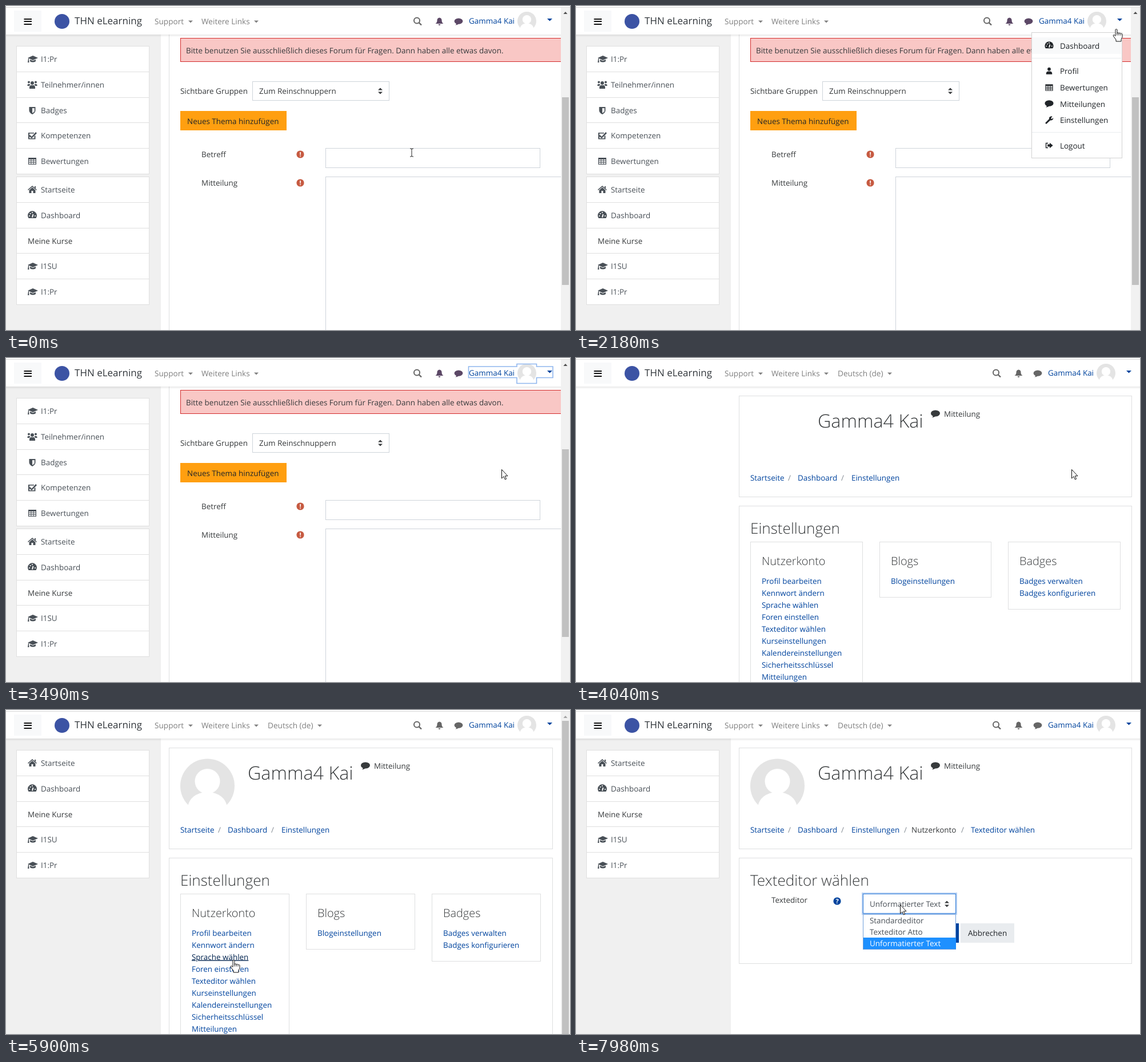
Write an HTML page that moves like this. It is 987 px wide and 568 px high and loops after 8000 ms.

```html
<!DOCTYPE html>
<html lang="de">
<head>
<meta charset="utf-8">
<title>Texteditor wählen</title>
<style>
  html, body { margin: 0; width: 100%; height: 100%; overflow: hidden; background: #fff; }
  svg { display: block; width: 987px; height: 568px; }
  text { font-family: "Open Sans", "Noto Sans", sans-serif; text-rendering: geometricPrecision; }
</style>
</head>
<body>
<svg id="stage" viewBox="0 0 987 568"></svg>
<script>
const stage = document.getElementById('stage');
const LOOP = 8000, USER = 'Gamma4 Kai';
const INK = '#373a3c', LINK = '#00449e', LINE = '#dedfe0', FIELD = '#ced4da', BODY = 13.45;

// Glyphs centred on 0,0: filled path, then white strokes on top
const ICONS = {
  cap: ['M-9-2L0-6 9-2 0 2ZM-5 1V4Q0 7 5 4V1L0 3ZM-8-1L-9 6H-6.5L-7-1Z'],
  users: ['M-3-3a3 3 0 1 1 6 0a3 3 0 1 1-6 0M-5 7V4Q-4 0 0 1 4 0 5 4V7Z' +
    'M-8-4.5a2 2 0 1 1 4 0a2 2 0 1 1-4 0M4-4.5a2 2 0 1 1 4 0a2 2 0 1 1-4 0' +
    'M-8.5 2V0Q-7-2-3.5-1L-5 2ZM8.5 2V0Q7-2 3.5-1L5 2Z'],
  shield: ['M-5.5-6H5.5V0Q5.5 4 0 7-5.5 4-5.5 0Z', 'M1-4V4.2M2.8-4V2.6'],
  check: ['M-7-5H3V-3.5H-5V5H3.5V1L5.5 0V6.5H-7ZM-4-1L-1 2 6-6 8-4-1 5-6 1Z'],
  table: ['M-7-6H7V6H-7Z', [-2, 1, 4].map(y => `M-5.8 ${y}h3.2m1 0h3.2m1 0h3.2`).join('')],
  home: ['M-8 0L0-7 8 0 7 1 0-5-7 1ZM-5.5 1L0-4 5.5 1V6H1.5V2H-1.5V6H-5.5ZM4-6H6V-2L4-4Z'],
  gauge: ['M-6.5 5A8 8 0 1 1 6.5 5Z', 'M0 3.5L1.5-2M-5.8 1h1.6M-4.2-3h1.6M-.8-5h1.6M4.2 1h1.6'],
  user: ['M-3-3.5a3 3 0 1 1 6 0a3 3 0 1 1-6 0M-5.5 6V4Q-5 0 0 .5 5 0 5.5 4V6Z'],
  bubble: ['M-8-1a8 5.5 0 1 1 8 5.5Q-3 6-6 6.5-4 5-4.5 3.8-8 2-8-1Z'],
  wrench: ['M-7 5L0-2Q-1-6 4-7L6-6.5 3.5-4 4-2.5 5.5-2 7.5-4.5Q8 1 2 .5L-5 7Q-7 7-7 5Z'],
  logout: ['M-2-5H-6.5V5H-2V3.5H-5V-3.5H-2ZM-3-2H1V-5L7 0 1 5V2H-3Z'],
  bell: ['M-7 4Q-4 2-4-2-4-6 0-6.5 4-6 4-2 4 2 7 4ZM-2 5H2Q1.5 7 0 7-1.5 7-2 5Z']
};

const CURSORS = {
  arrow: '<path d="M.5.5V16L4 12.7 6.4 18 8.6 17 6.3 11.8H11Z" fill="#fff" stroke="#111"/>',
  beam: '<path d="M-3-7H-1L0-6 1-7H3M0-6V6M-3 7H-1L0 6 1 7H3" fill="none" stroke="#222"/>',
  hand: '<path d="M-1 2Q-1 .5 .5 .5T2 2V8Q2 7 3.5 7T5 8.5Q5 7.5 6.5 7.5T8 9Q8 8.5 9.5 8.5T11 10V14.5L9 18.5V22' +
    'H0V19L-4.5 13Q-5.5 10.5-3.5 10.5L-1 12.5Z" fill="#fff" stroke="#111"/>' +
    '<path d="M2 7.5V11.5M5 8.5V11.5M8 9.5V11.5" stroke="#111"/>'
};

// Pointer moves: first step, last step, number of steps, end point
const MOVES = [
  [70, 70, 1, 711, 257], [230, 700, 7, 969, 70], [780, 1010, 4, 954, 21],
  [2180, 2790, 9, 870, 191], [3020, 3020, 1, 868, 195], [3190, 3190, 1, 867, 195],
  [4350, 4580, 4, 424, 251], [4810, 5200, 6, 406, 435], [5350, 5500, 3, 399, 431],
  [5900, 6280, 6, 394, 475], [7360, 7740, 6, 567, 341]
];
const CLICKS = [[1080, 1320], [3340, 3490], [6510, 6590], [7800, 7980]];

const within = (t, a, b) => t >= a && t < b;
const rect = (x, y, w, h, fill, stroke = 'none') =>
  `<rect x="${x}" y="${y}" width="${w}" height="${h}" fill="${fill}" stroke="${stroke}"/>`;
const box = (x, y, right, bottom, fill = '#fff', stroke = LINE) =>
  rect(x + .5, y + .5, right - x - 1, bottom - y - 1, fill, stroke);
const path = (d, fill, more = '') => `<path d="${d}" fill="${fill}" ${more}/>`;
const circle = (x, y, r, fill, more = '') => `<circle cx="${x}" cy="${y}" r="${r}" fill="${fill}" ${more}/>`;
const text = (x, y, s, fill = INK, size = BODY, more = '') =>
  `<text x="${x}" y="${y}" fill="${fill}" font-size="${size}" ${more}>${s}</text>`;
const light = (x, y, s, size) => text(x, y, s, INK, size, 'font-weight="300"');
const at = (x, y, body, scale = 1) => `<g transform="translate(${x} ${y}) scale(${scale})">${body}</g>`;
const caret = (x, y, fill, w = 4) => path(`M${x - w} ${y}h${2 * w}l${-w} ${w}z`, fill);
const sorter = (x, y) => path(`M${x - 4} ${y - 1.5}h8l-4-4zM${x - 4} ${y + 1.5}h8l-4 4z`, INK);
const badge = (x, y, mark, fill) => circle(x, y, 6.6, fill) +
  text(x, y + 4, mark, '#fff', 11, 'font-weight="700" text-anchor="middle"');

function icon(name, x, y, fill = '#495057', scale = 1) {
  const [d, cut] = ICONS[name];
  return at(x, y, path(d, fill) + (cut ? path(cut, 'none', 'stroke="#fff" stroke-width="1.9"') : ''), scale);
}

const avatar = (x, y, r) => at(x, y, circle(0, 0, 47.5, '#e4e4e4') + circle(0, -8, 22, '#fff') +
  path('M-34 35C-28 3 28 3 34 35L20 48H-20Z', '#fff'), r / 47.5);

function header(shift, lang, tint, hover, focus) {
  const blue = hover ? '#c4720c' : LINK, grey = '#7f7f7f';
  let s = rect(0, 0, 987, 50, '#fff') + rect(0, 2, 987, 1, '#d8d8d8') + rect(14, 8, 48, 37, '#f8f9fa');
  for (let i = 0; i < 4; i++) s += rect(0, 50 + i, 987, 1, `rgba(0,0,0,${.08 - i * .02})`);
  for (const y of [22, 26, 31]) s += rect(31.5, y, 13.5, 2, '#111');
  s += circle(98, 27, 13, '#3c53a4') + text(120, 32, 'THN eLearning', '#30353a', 17);
  s += text(260, 32, 'Support', grey, 13.6) + caret(323, 25.5, grey);
  s += text(342, 32, 'Weitere Links', grey, 13.6) + caret(438, 25.5, grey);
  if (lang) s += text(458, 32, 'Deutsch (de)', grey, 13.6) + caret(549, 25.5, grey);
  return s + at(shift, 0,
    circle(719, 25.5, 5, 'none', 'stroke="#666" stroke-width="2"') +
    path('M722.5 29L727 33.5', 'none', 'stroke="#666" stroke-width="2.4"') +
    icon('bell', 758.5, 27, tint) + icon('bubble', 792, 27.5, tint, .93) +
    text(810, 31, USER, blue) + avatar(911.5, 26.5, 16.5) + caret(951.5, 22, blue, 4.5) +
    (focus ? path('M809.5 15H894V10.5H928.5V15H957V34.5H928.5V44.5H894V34.5H809.5Z', 'none',
      'stroke="#8fb6ee" stroke-width="1.6"') : ''));
}

function list(top, rows) {
  return rows.map(([glyph, label], i) => {
    const y = Math.round(top + i * 44.8), bottom = Math.round(top + (i + 1) * 44.8) + 1;
    return box(18, y, 251, bottom, '#fff', '#dfdfdf') +
      (glyph ? icon(glyph, glyph === 'cap' ? 47 : 46, y + 23) : '') +
      text(glyph ? 61 : 38, y + 28, label, glyph ? '#495057' : INK);
  }).join('');
}

const COMMON = [['home', 'Startseite'], ['gauge', 'Dashboard'], ['', 'Meine Kurse'], ['cap', 'I1SU'], ['cap', 'I1:Pr']];
const COURSE = [['cap', 'I1:Pr'], ['users', 'Teilnehmer/innen'], ['shield', 'Badges'], ['check', 'Kompetenzen'], ['table', 'Bewertungen']];
const sidebar = lists => rect(0, 50, 271, 518, '#f0f0f0') + lists;

const scrollbar = (top, bottom, arrow) => rect(971, 3, 16, 565, '#f1f1f1') +
  path('M975.5 14h7l-3.5-4z', arrow) + rect(973, top, 12, bottom - top, '#c1c1c1');

function forum() {
  return sidebar(list(70, COURSE) + list(299, COMMON)) + rect(285, 50, 1, 518, LINE) +
    box(305, 56, 990, 98, '#f9c7c5', '#d32b2b') +
    text(315, 83, 'Bitte benutzen Sie ausschließlich dieses Forum für Fragen. Dann haben alle etwas davon.') +
    text(305, 154, 'Sichtbare Gruppen') + box(431, 132, 671, 166, '#fff', FIELD) +
    text(443, 154, 'Zum Reinschnuppern') + sorter(655, 149) +
    rect(305, 184, 186, 34, '#ff9f10') + text(317, 207, 'Neues Thema hinzufügen', '#212529') +
    text(342, 265, 'Betreff') + badge(515, 260, '!', '#c65a41') + box(559, 249, 935, 284, '#fff', FIELD) +
    text(342, 315, 'Mitteilung') + badge(515, 310, '!', '#c65a41') + box(559, 299, 990, 580, '#fff', FIELD);
}

function menu(active) {
  const items = [['gauge', 'Dashboard', 69.5], ['user', 'Profil', 114], ['table', 'Bewertungen', 143],
    ['bubble', 'Mitteilungen', 171.5], ['wrench', 'Einstellungen', 200], ['logout', 'Logout', 244.5]];
  return box(797, 46, 956, 267, '#fff', '#d2d2d2') + rect(798, 55, 156, 29, '#f8f9fa') +
    (active ? rect(798, 186, 156, 28, '#f8f9fa') : '') +
    rect(798, 91, 156, 1, '#e9ecef') + rect(798, 221, 156, 1, '#e9ecef') +
    items.map(([g, s, y]) => icon(g, 828, y, '#212529', .95) + text(847, y + 5, s, '#212529')).join('');
}

// Crumbs: position of the separator, position of the label, label, colour
function profile(right, photo, more = []) {
  const crumbs = [[371, 388, 'Dashboard', LINK], [464, 482, 'Einstellungen', LINK], ...more];
  return box(285, 66, right, 244) + (photo ? avatar(352.5, 133, 47.5) : '') +
    light(423, 122, USER, 32.3) + icon('bubble', 629, 98, INK) + text(644, 103, 'Mitteilung') +
    text(305, 215, 'Startseite', LINK) +
    crumbs.map(([slash, x, s, fill]) => text(slash, 215, '/', '#868e96') + text(x, 215, s, fill)).join('');
}

const CARDS = [
  ['Nutzerkonto', 600, ['Profil bearbeiten', 'Kennwort ändern', 'Sprache wählen', 'Foren einstellen', 'Texteditor wählen',
    'Kurseinstellungen', 'Kalendereinstellungen', 'Sicherheitsschlüssel', 'Mitteilungen']],
  ['Blogs', 420, ['Blogeinstellungen']],
  ['Badges', 441, ['Badges verwalten', 'Badges konfigurieren']]
];

function settings(loaded, hot) {
  const right = loaded ? 957 : 973, width = loaded ? 191.3 : 196.8, pitch = loaded ? 220 : 225.5;
  return (loaded ? sidebar(list(70, COMMON)) : '') + profile(right, loaded) +
    box(285, 259, right, 600) + light(305, 308, 'Einstellungen', 26.1) +
    CARDS.map(([title, bottom, links], i) => {
      const left = 305 + i * pitch, x = Math.round(left);
      return box(x, 322, Math.round(left + width), bottom) + light(x + 20, 363, title, 19.9) + links.map((s, j) => {
        const on = i === 0 && j === hot;
        return text(x + 20, 395.5 + j * 21, s, on ? '#00234f' : LINK, BODY, on ? 'text-decoration="underline"' : '');
      }).join('');
    }).join('');
}

function editor(loaded, open) {
  let s = (loaded ? sidebar(list(70, COMMON)) : '') +
    profile(973, true, [[574, 587, 'Nutzerkonto', INK], [674, 691, 'Texteditor wählen', LINK]]) +
    box(285, 259, 973, 445) + light(305, 308, 'Texteditor wählen', 26.1) +
    text(342, 338, 'Texteditor') + badge(457, 335, '?', LINK) +
    rect(502, 374, 168, 34, LINK) + text(514, 396, 'Änderungen speichern', '#fff') +
    rect(673, 374, 94, 34, '#e9ecef') + text(686, 396, 'Abbrechen', '#212529');
  if (open) s += rect(500, 320, 167, 39, '#b9d2f3');
  s += box(502, 322, 665, 357, '#fff', open ? '#2f7bd9' : FIELD) +
    text(514, 345, 'Unformatierter Text', '#495057') + sorter(649, 340);
  if (open) s += box(502, 358, 665, 420, '#fff', '#6f9fdc') + rect(503, 399, 162, 20, '#1e90ff') +
    text(514, 374, 'Standardeditor', '#495057') + text(514, 394, 'Texteditor Atto', '#495057') +
    text(514, 413.5, 'Unformatierter Text', '#fff');
  return s;
}

function pointer(t) {
  let x = 710, y = 257;
  for (const [start, end, n, toX, toY] of MOVES) {
    if (t < start) break;
    const step = n > 1 ? Math.floor((t - start) / (end - start) * (n - 1) + .01) + 1 : 1;
    const p = Math.min(1, step / n);
    x += (toX - x) * p;
    y += (toY - y) * p;
  }
  return [x, y];
}

function cursorKind(t) {
  if (t < 230) return 'beam';
  return within(t, 933, 3420) || within(t, 5100, 6890) ? 'hand' : 'arrow';
}

function picture(t) {
  const [x, y] = pointer(t), kind = cursorKind(t);
  let s;
  if (t < 4040) {
    const focus = within(t, 1160, 1320) || t >= 3420;
    s = forum() + header(0, false, '#5c4866', within(t, 933, 2180), focus) + scrollbar(160, 489, '#505050');
    if (within(t, 1240, 3420)) s += menu(y > 186);
  } else if (t < 6820) {
    const loaded = t >= 4120;
    s = settings(loaded, kind === 'hand' ? Math.floor((y - 380) / 21) : -1) +
      header(loaded ? 0 : 16, true, '#666');
    if (loaded) s += scrollbar(19, 568, '#a3a3a3');
  } else {
    s = editor(t >= 6890, t >= 7890) + header(16, true, '#666');
  }
  if (CLICKS.some(([a, b]) => within(t, a, b))) s += circle(x, y, 14, '#fae12c', 'opacity=".8"');
  return s + at(Math.round(x), Math.round(y), CURSORS[kind]);
}

let shown = '';
function draw(now) {
  const next = picture(now % LOOP);
  if (next !== shown) stage.innerHTML = shown = next;
  requestAnimationFrame(draw);
}
draw(performance.now());
</script>
</body>
</html>
```
